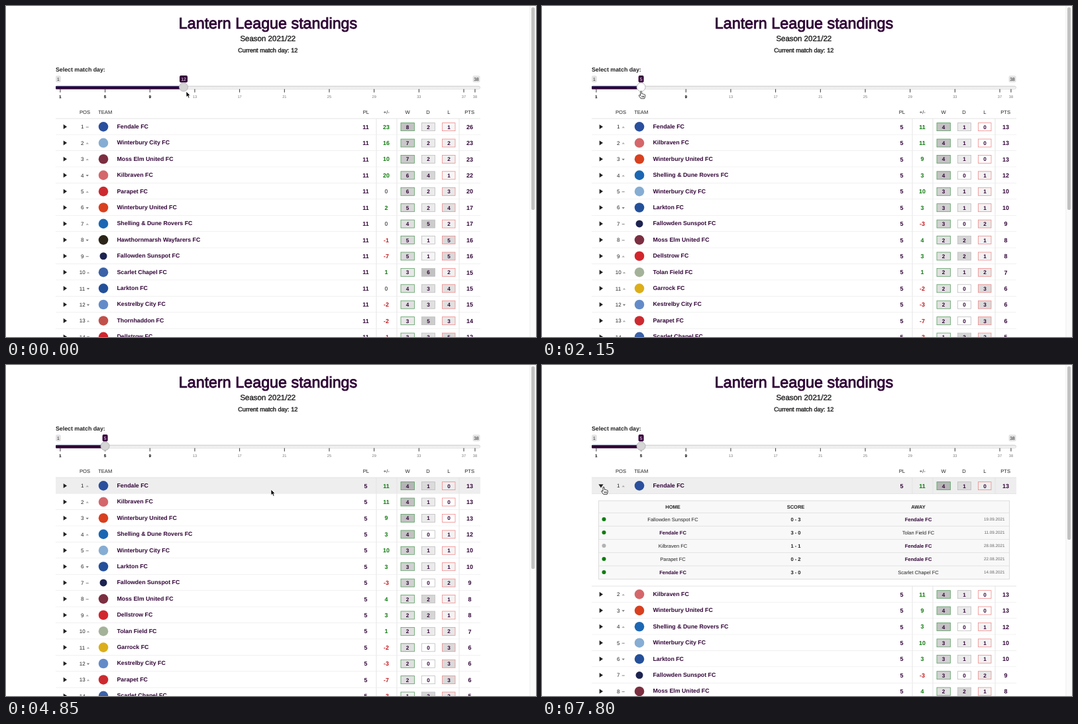
Animation, 800 px wide and 500 px high, one loop 7.85 s. Source, as an HTML page:

```html
<!DOCTYPE html>
<html lang="en">
<head>
<meta charset="utf-8">
<title>League standings</title>
<style>
  html, body { margin: 0; width: 100%; height: 100%; overflow: hidden; background: #fff; }
  svg { display: block; width: 800px; height: 500px; }
  text { font-family: "Liberation Sans", Arial, sans-serif; fill: #222; text-rendering: geometricPrecision; white-space: pre; }
  .b { font-weight: 700; }
  .m { stroke: currentColor; stroke-width: .4px; color: #222; }
  .p { fill: #320538; }
  .title { fill: #2f0536; color: #2f0536; stroke-width: .85px; }
  .pos { fill: #107a10; }
  .neg { fill: #c4161c; }
  .zero, .date { fill: #666; }
  .rule { stroke: #e4e4e4; stroke-width: 1; }
</style>
</head>
<body>
<svg id="stage" viewBox="0 0 800 500"></svg>
<script>
const LOOP = 7850, ROW = 24.42, TOP = 170, PANEL = 139.6;
const SWAP = 1650, OPEN = 6300;
const DRAG = [450, 1600];

const teams = {
  fen: ["Fendale FC", "#2a4f9c"],
  wic: ["Winterbury City FC", "#86add3"],
  mos: ["Moss Elm United FC", "#7b2f40"],
  kil: ["Kilbraven FC", "#d4676b"],
  par: ["Parapet FC", "#cc2a30"],
  wiu: ["Winterbury United FC", "#d8401f"],
  she: ["Shelling & Dune Rovers FC", "#1c67b3"],
  haw: ["Hawthornmarsh Wayfarers FC", "#2b2519"],
  fal: ["Fallowden Sunspot FC", "#1d2350"],
  sca: ["Scarlet Chapel FC", "#3b62a8"],
  lar: ["Larkton FC", "#24509a"],
  kes: ["Kestrelby City FC", "#638bc8"],
  tho: ["Thornhaddon FC", "#c1504a"],
  del: ["Dellstrow FC", "#d2262d"],
  tol: ["Tolan Field FC", "#a5b29a"],
  gar: ["Garrock FC", "#dcae1a"]
};

// Each row: team, trend, goal difference, wins, draws
const days = [
  { played: 11, max: [8, 6, 8], rows: `fen = 23 8 2,wic + 16 7 2,mos + 10 7 2,kil - 20 6 4,par + 0 6 2,
    wiu - 2 5 2,she + 0 4 5,haw - -1 5 1,fal = -7 5 1,sca + 1 3 6,lar - 0 4 3,kes - -2 4 3,tho + -2 3 5,del - -1 3 3` },
  { played: 5, max: [4, 3, 5], rows: `fen + 11 4 1,kil + 11 4 1,wiu - 9 4 1,she + 3 4 0,wic = 10 3 1,
    lar - 3 3 1,fal = -3 3 0,mos = 4 2 2,del + 3 2 2,tol + 1 2 1,gar + -2 2 0,kes - -3 2 0,par + -7 2 0,sca = -3 1 2` }
];

const matches = [
  ["fal", "0 - 3", "fen", "19.09.2021"],
  ["fen", "3 - 0", "tol", "11.09.2021"],
  ["kil", "1 - 1", "fen", "28.08.2021"],
  ["par", "0 - 2", "fen", "22.08.2021"],
  ["fen", "3 - 0", "sca", "14.08.2021"]
];

// Text placed by the vertical centre of its capitals
const text = (x, y, s, size, cls = "", anchor = "middle") =>
  `<text x="${x}" y="${y + size * .36}" font-size="${size}" class="${cls}" text-anchor="${anchor}">${String(s).replace("&", "&amp;")}</text>`;
const rect = (x, y, w, h, fill, more = "") =>
  `<rect x="${x}" y="${y}" width="${w}" height="${h}" fill="${fill}" ${more}/>`;
const line = (x1, y1, x2, y2) => `<path class="rule" d="M${x1} ${y1}L${x2} ${y2}"/>`;
const gradient = (id, ...stops) => `<linearGradient id="${id}" x2="0" y2="1">` +
  stops.map((c, i) => `<stop offset="${i / (stops.length - 1)}" stop-color="${c}"/>`).join("") + "</linearGradient>";
const tickX = v => 81.9 + (v - 1) * 16.92;

function trend(kind, x, y) {
  const d = { "=": "M-2 0h4", "+": "M-2.2 1.2L0-1.3L2.2 1.2z", "-": "M-2.2-1.2L0 1.3L2.2-1.2z" }[kind];
  const paint = kind === "=" ? 'stroke="#777" stroke-width=".9"' : `fill="${kind === "+" ? "#aaa" : "#777"}"`;
  return `<path d="${d}" transform="translate(${x} ${y})" ${paint}/>`;
}

function row(spec, i, day) {
  const [id, kind, ...nums] = spec.trim().split(" ");
  const [gd, won, drawn] = nums.map(Number);
  const [name, colour] = teams[id];
  const y = 182.2 + ROW * i, wide = i > 8;
  const results = [won, drawn, day.played - won - drawn];
  const cells = results.map((n, c) => {
    const x = [596, 627.5, 658.5][c], shade = .24 * n / day.max[c];
    return rect(x, y - 5.6, [20.5, 20, 19.5][c], 12, `rgba(0,0,0,${shade})`,
      `stroke="${["#5a9e62", "#bdbdbd", "#f08a8a"][c]}" stroke-width=".8"`) +
      text(x + 10, y + .5, n, 8.2, "b p");
  }).join("");
  const gdClass = gd > 0 ? "b pos" : gd < 0 ? "b neg" : "b zero";
  return `<g>
    ${rect(75, TOP + ROW * i, 641, ROW, "#fff", 'class="bg"')}
    ${line(75, TOP + ROW * (i + 1), 716, TOP + ROW * (i + 1))}
    ${[559, 590, 684].map(x => line(x, TOP + ROW * i, x, TOP + ROW * (i + 1))).join("")}
    <path class="arrow" d="M-2.3-3.6L3 0L-2.3 3.6z" fill="#222" transform="translate(89 ${y + .2})"/>
    ${text(wide ? 110.8 : 113, y + .3, i + 1, 8, "", "start")}${trend(kind, wide ? 124 : 122.7, y + .8)}
    <circle cx="147" cy="${y + .2}" r="${id === "fal" ? 5.5 : 7.3}" fill="${colour}"/>
    ${text(167.5, y - .5, name, 8.8, "b p", "start")}
    ${text(543, y + .3, day.played, 8.9, "b p")}${text(574, y + .2, gd, 8.9, gdClass)}
    ${cells}${text(700, y + .3, won * 3 + drawn, 9, "b p")}</g>`;
}

const table = day => {
  const [first, ...rest] = day.rows.split(",").map((s, i) => row(s, i, day));
  return `<g class="table">${first}<g class="rest">${rest.join("")}</g></g>`;
};

const panel = `<g id="panel">
  ${rect(85.5, 205, 620, 118.5, "#f8f8f8", 'stroke="#ddd"')}
  ${["HOME", "SCORE", "AWAY"].map((s, i) => text([197.5, 383, 568][i], 214.3, s, 7.5, "b")).join("")}
  ${matches.map(([home, score, away, date], i) => {
    const y = 233.4 + i * 20;
    const side = (id, x) => text(x, y, teams[id][0], 7.55, id === "fen" ? "b p" : "");
    return line(86, y - 10, 705, y - 10) +
      `<circle cx="93.5" cy="${y - .4}" r="3" fill="${score === "1 - 1" ? "#b2b2b2" : "#0b7d0b"}"/>` +
      side(home, 197.5) + text(383, y, score, 7.6, "b") + side(away, 568) +
      text(698.5, y - .4, date, 6.3, "date", "end");
  }).join("")}
  ${line(75, TOP + ROW + PANEL, 716, TOP + ROW + PANEL)}</g>`;

const ticks = [1, 5, 9, 13, 17, 21, 25, 29, 33, 37, 38].map(v =>
  `<path d="M${tickX(v)} 125.5v5" stroke="#333"/>` +
  `<g opacity="${v < 13 ? 1 : .6}">${text(tickX(v), 136.8, v, 5.7, v < 13 ? "m" : "")}</g>`).join("");

const pill = (x, w, s) => rect(x, 105.2, w, 10, "#e3e3e3", 'rx="2"') + text(x + w / 2, 110.2, s, 6.7);

document.getElementById("stage").innerHTML = `
  <defs>${gradient("rail", "#dedede", "#fff")}${gradient("bar-fill", "#3f6fae", "#2f0536", "#2f0536", "#2f0536", "#2f0536")}</defs>
  ${text(395.5, 25.5, "Lantern League standings", 23.3, "m title")}
  ${text(395.3, 49.3, "Season 2021/22", 11.5, "m")}
  ${text(395.3, 66.5, "Current match day: 12", 9.1, "m")}
  ${text(75, 95.8, "Select match day:", 8.8, "b", "start")}
  ${pill(75, 7.8, 1)}${pill(704.5, 11, 38)}
  ${rect(75.4, 121, 640.2, 4.4, "url(#rail)", 'rx="2.2" stroke="#ccc" stroke-width=".7"')}
  ${rect(75, 120.7, 0, 5, "url(#bar-fill)", 'id="fill" rx="1"')}
  ${ticks}
  <g id="thumb">
    ${rect(-6, 105, 12, 10.5, "#37003c", 'id="tag" rx="2"')}
    <text id="value" y="112.6" font-size="6.8" text-anchor="middle" style="fill:#fff"></text>
    <circle id="knob" cy="122.5" r="6.5" stroke="#b4b4b4" stroke-width=".9"/>
  </g>
  ${[["POS", 119], ["TEAM", 149.7], ["PL", 543.3], ["+/-", 574.3], ["W", 606], ["D", 637], ["L", 668.3], ["PTS", 699.6]]
    .map(([s, x]) => text(x, 160.4, s, 7.6)).join("")}
  ${days.map(table).join("")}
  ${panel}
  ${line(75, TOP, 716, TOP)}
  ${rect(791, 0, 9, 500, "#fafafa")}${rect(790.5, 0, .8, 500, "#ececec")}
  ${rect(793, 2, 5.2, 306, "#c2c2c2", 'id="bar" rx="2.6"')}
  <g id="cursor" stroke="#fff" stroke-linejoin="round">
    <path id="pointer" d="M0 0V8.6L2 6.8L3.5 10.2L5.1 9.5L3.7 6.2H6.2z" fill="#000" stroke-width=".8"/>
    <path id="hand" d="M-1 .8Q0-.6 1 .8V4.2Q2.2 3.4 3 4.6Q4.2 4 4.7 5.2Q6 4.8 6.2 6V8L5.2 11.3H-.2L-3.2 7.2Q-3.4 5.7-2 6L-1 7z
      M1.3 7.2V9.4M2.8 7.2V9.4M4.2 7.2V9.4" fill="#fff" stroke="#111" stroke-width=".8"/>
  </g>`;

const $ = id => document.getElementById(id);
const tables = [...document.querySelectorAll(".table")];
const backs = tables.map(t => [...t.querySelectorAll(".bg")]);
const arrow = tables[1].querySelector(".arrow");
const rest = tables[1].querySelector(".rest");
const show = (el, on) => el.setAttribute("visibility", on ? "visible" : "hidden");

// Cursor stops: time, x, y
const path = [
  [0, 272, 129], [60, 272, 129], [350, 268, 125], [500, 268, 125], [1250, 149.5, 128.5],
  [3250, 149.5, 128.5], [3900, 536, 186], [4100, 536, 186], [4850, 400, 188],
  [5450, 228, 197], [5600, 228, 197], [6200, 93, 184], [LOOP, 93, 184]
];
const ease = k => k * k * (3 - 2 * k);

function cursorAt(t) {
  const i = Math.max(1, path.findIndex(p => p[0] > t));
  const [t0, x0, y0] = path[i - 1], [t1, x1, y1] = path[i];
  const k = ease((t - t0) / (t1 - t0));
  return [x0 + (x1 - x0) * k, y0 + (y1 - y0) * k];
}

function draw(t) {
  const [x, y] = cursorAt(t);
  const held = t >= DRAG[0] && t < DRAG[1];
  const value = t < DRAG[0] ? 12 : held ? Math.round((x - 81.9) / 16.92 + 1) : 5;
  const knobX = tickX(value);
  const onKnob = held || Math.hypot(x - knobX, y - 122.5) < 7;
  const onArrow = x < 97 && y > TOP;

  $("fill").setAttribute("width", knobX - 75);
  $("thumb").setAttribute("transform", `translate(${knobX} 0)`);
  $("value").textContent = value;
  const tagW = value > 9 ? 12 : 8;
  $("tag").setAttribute("x", -tagW / 2);
  $("tag").setAttribute("width", tagW);
  $("knob").setAttribute("fill", onKnob ? "#fff" : "#d5d5d5");

  const now = t < SWAP ? 0 : 1, open = t >= OPEN;
  tables.forEach((el, i) => show(el, i === now));
  const over = Math.floor((y - TOP) / ROW);
  backs[now].forEach((el, i) => el.setAttribute("fill", i === over ? "#eee" : "#fff"));

  show($("panel"), open);
  rest.setAttribute("transform", `translate(0 ${open ? PANEL : 0})`);
  $("bar").setAttribute("height", open ? 262 : 306);
  const turn = 90 * ease(Math.min(1, Math.max(0, (t - OPEN) / 200)));
  arrow.setAttribute("transform", `translate(89 182.5) rotate(${turn})`);

  $("cursor").setAttribute("transform", `translate(${x} ${y})`);
  show($("hand"), onKnob || onArrow);
  show($("pointer"), !(onKnob || onArrow));
}

const start = performance.now();
function tick() {
  draw((performance.now() - start) % LOOP);
  requestAnimationFrame(tick);
}
tick();
</script>
</body>
</html>
```
